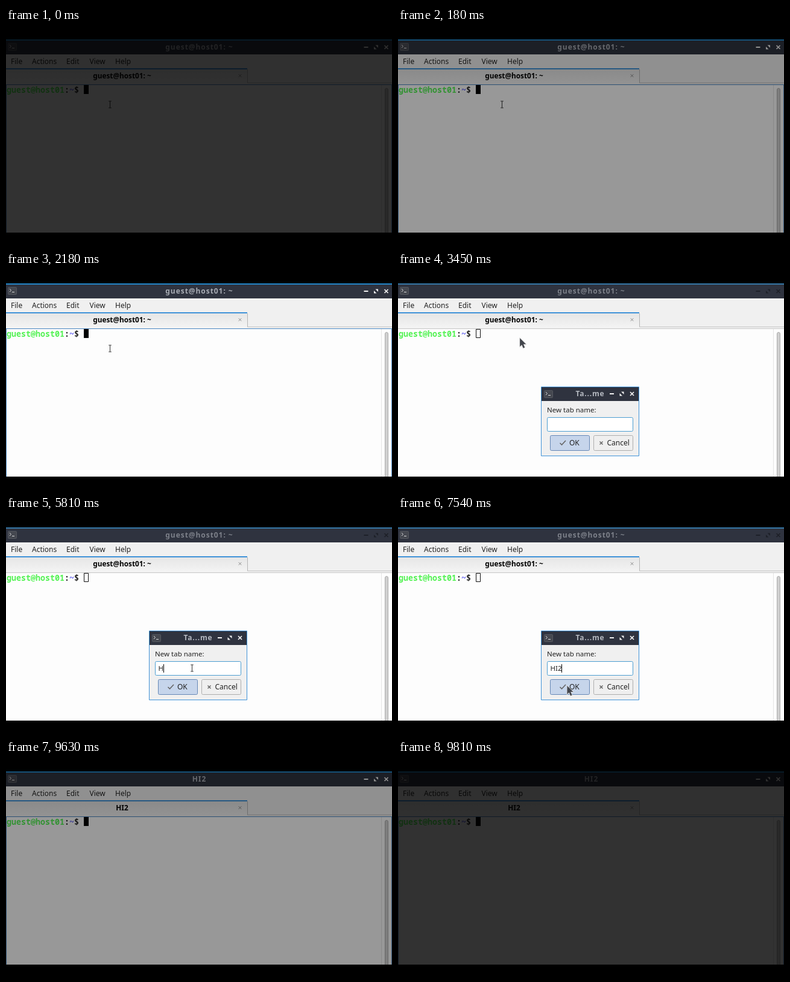
An HTML page with a canvas that plays this animation: 640 by 360 pixels, repeating every 9.9 s.

```html
<!DOCTYPE html>
<html lang="en">
<head>
<meta charset="utf-8">
<title>Renaming a terminal tab</title>
<style>
html, body { margin: 0; width: 100%; height: 100%; overflow: hidden; background: #000; }
canvas { display: block; }
</style>
</head>
<body>
<canvas id="stage" width="640" height="360"></canvas>
<script>
const ctx = document.getElementById('stage').getContext('2d');
const LOOP = 9900, OPEN = 3180, CLOSE = 8000;
const SANS = '"Noto Sans", "Open Sans", sans-serif';
const MONO = 'bold 13.33px "Noto Sans Mono", "DejaVu Sans Mono", monospace';
const USER = 'guest@host01';
const BLUE = '#3f92d8', DARK = '#2f333f', PANEL = '#f0f0f0';
const KEYS = [[5500, 'H'], [6200, 'I'], [6500, '2']];
// time, x, y
const PATH = [[0, 172.5, 127.5], [2650, 172.5, 127.5], [2900, 204, 82], [3300, 204, 82],
  [3450, 202, 110], [4200, 308.5, 253.5], [6700, 308.5, 253.5], [7300, 280.5, 283]];

function rect(x, y, w, h, color) {
  ctx.fillStyle = color;
  ctx.fillRect(x, y, w, h);
}

function text(s, x, y, font, color, align = 'left', spacing = 0) {
  ctx.font = font;
  ctx.fillStyle = color;
  ctx.textAlign = align;
  ctx.letterSpacing = spacing + 'px';
  ctx.fillText(s, x, y);
  ctx.letterSpacing = '0px';
}

function line(points, color, width = 1) {
  ctx.beginPath();
  points.forEach(([x, y]) => ctx.lineTo(x, y));
  ctx.strokeStyle = color;
  ctx.lineWidth = width;
  ctx.stroke();
}

function box(x, y, w, h, r, fill, stroke) {
  ctx.beginPath();
  ctx.roundRect(x + .5, y + .5, w - 1, h - 1, r);
  ctx.fillStyle = fill;
  ctx.fill();
  ctx.strokeStyle = stroke;
  ctx.lineWidth = 1;
  ctx.stroke();
}

function cross(x, y, r, color, width) {
  line([[x - r, y - r], [x + r, y + r]], color, width);
  line([[x - r, y + r], [x + r, y - r]], color, width);
}

function icon(x, y) {
  box(x, y, 15, 13, 1, '#454850', '#55585f');
  line([[x + 3, y + 3], [x + 5.5, y + 5.5], [x + 3, y + 8]], '#ddd');
  rect(x + 7, y + 8, 4, 1, '#ddd');
}

function controls(x, y, color) {
  rect(x - 37, y - 1, 7, 2, color);
  ctx.fillStyle = color;
  for (const s of [1, -1]) {
    ctx.beginPath();
    ctx.moveTo(x - 17 + 3.5 * s, y - 3.5 * s);
    ctx.lineTo(x - 17 - s, y - 3.5 * s);
    ctx.lineTo(x - 17 + 3.5 * s, y + s);
    ctx.fill();
  }
  cross(x, y, 3, color, 1.7);
}

function drawWindow(active, name) {
  rect(0, 19, 640, 322, '#fdfdfd');
  rect(0, 19, 640, 2, active ? '#2387ca' : '#3678a8');
  rect(0, 21, 640, 23, DARK);
  icon(3, 25);
  text(name, 320.5, 36, 'bold 12px ' + SANS, active ? '#a9adb5' : '#7d818a', 'center', .95);
  controls(630.5, 32, active ? '#f2f2f2' : '#1d2028');

  rect(0, 44, 640, 50, PANEL);
  [['File', 8], ['Actions', 43], ['Edit', 100], ['View', 138.5], ['Help', 181]]
    .forEach(([s, x]) => text(s, x, 60, '12px ' + SANS, '#222'));

  const shade = ctx.createLinearGradient(0, 69, 0, 92);
  shade.addColorStop(0, '#e6e6e6');
  shade.addColorStop(1, '#f3f3f3');
  rect(0, 69, 400, 24, shade);
  rect(0, 67, 400, 2, BLUE);
  rect(400, 69, 1, 23, '#b4b4b4');
  rect(400, 91, 240, 1, '#c4c4c4');
  text(name, 192.5, 84, 'bold 11.8px ' + SANS, '#000', 'center');
  cross(388, 79.5, 2.3, '#8a8a8a', 1);

  rect(0, 94, 640, 1, active ? '#4a87c2' : '#c8c8c8');
  rect(622, 95, 1, 246, '#e4e4e4');
  box(628, 100, 6, 250, 3, '#d0d0d0', '#adadad');
  if (active) {
    rect(0, 94, 1, 247, '#4a87c2');
    rect(639, 94, 1, 247, '#4a87c2');
  }

  text(USER, 1, 108, MONO, '#54f254');
  text(':', 97, 108, MONO, '#222');
  text('~', 105, 108, MONO, '#5454f0');
  text('$', 113, 108, MONO, '#222');
  if (active) rect(129, 95, 8, 15, '#000');
  else box(129, 95, 8, 15, 0, '#fdfdfd', '#111');
}

function drawDialog(t) {
  box(237, 191, 163, 116, 0, PANEL, BLUE);
  rect(238, 192, 161, 23, DARK);
  icon(242, 197);
  text('Ta...me', 318.5, 207, 'bold 12px ' + SANS, '#b4b8c0', 'center', .8);
  controls(388, 203, '#f2f2f2');
  text('New tab name:', 247, 234, '11.5px ' + SANS, '#222');
  box(247, 242, 143, 24, 2, '#fff', '#4b9dd0');

  const typed = KEYS.filter(([at]) => t >= at);
  const value = typed.map(key => key[1]).join('');
  const blinkStart = typed.length ? typed[typed.length - 1][0] : OPEN - 500;
  text(value, 252.5, 258, '11.5px ' + SANS, '#222');
  if ((t - blinkStart) % 1000 < 500) {
    rect(Math.round(252.5 + ctx.measureText(value).width), 247, 1, 14, '#000');
  }

  box(252, 272, 66, 26, 2, '#c6d5eb', '#6587b5');
  line([[268.5, 285], [271.5, 288], [278, 281]], '#666', 1.6);
  text('OK', 284, 289, '12px ' + SANS, '#222');
  box(324, 272, 66, 26, 2, '#efefef', '#adadad');
  cross(337, 285, 2.5, '#666', 1.5);
  text('Cancel', 346.5, 289, '12px ' + SANS, '#222');
}

function pointerAt(t) {
  const i = PATH.findIndex(p => p[0] > t);
  if (i < 0) return PATH[PATH.length - 1].slice(1);
  const [t0, x0, y0] = PATH[i - 1], [t1, x1, y1] = PATH[i];
  const k = (t - t0) / (t1 - t0);
  return [x0 + (x1 - x0) * k, y0 + (y1 - y0) * k];
}

function drawPointer(t) {
  const [x, y] = pointerAt(t);
  const overText = t < OPEN
    ? y > 95
    : x > 247 && x < 390 && y > 242 && y < 266;
  ctx.save();
  ctx.translate(x, y);
  if (overText) {
    line([[0, -6], [0, 6]], '#333');
    for (const end of [-5.5, 5.5]) line([[-2.5, end], [2.5, end]], '#555');
  } else {
    ctx.beginPath();
    [[0, 0], [0, 14], [3.2, 11], [5.5, 16.5], [8, 15.5], [5.7, 10], [10, 10]]
      .forEach(([px, py]) => ctx.lineTo(px, py));
    ctx.closePath();
    ctx.strokeStyle = '#ddd';
    ctx.lineWidth = 1.5;
    ctx.stroke();
    ctx.fillStyle = '#42454c';
    ctx.fill();
  }
  ctx.restore();
}

function brightness(t) {
  const step = ms => Math.floor((ms + 1) / 90);
  return Math.min(1, .2 + .2 * step(t), 1 - .2 * step(t - 9450));
}

function frame() {
  const t = performance.now() % LOOP;
  const renaming = t >= OPEN && t < CLOSE;
  rect(0, 0, 640, 360, '#000');
  drawWindow(!renaming, t < CLOSE ? USER + ': ~' : 'HI2');
  if (renaming) drawDialog(t);
  if (t < CLOSE) drawPointer(t);
  rect(0, 341, 640, 19, '#000');
  rect(0, 0, 640, 360, `rgba(0, 0, 0, ${1 - brightness(t)})`);
  requestAnimationFrame(frame);
}
requestAnimationFrame(frame);
</script>
</body>
</html>
```
